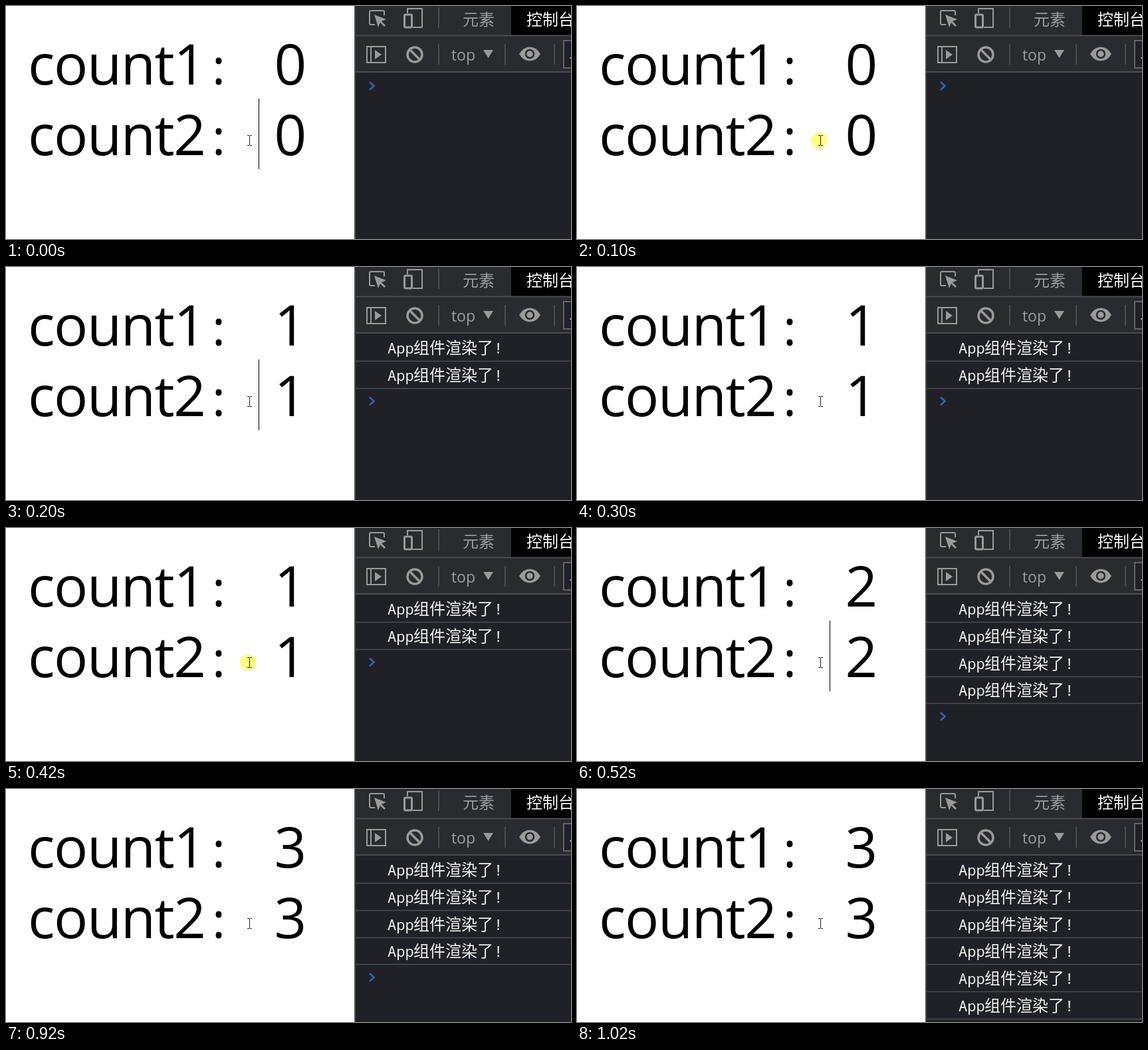
Recreate the animation shown at these times as an HTML page. Size 850 by 350 pixels, loop 1.32 s.

```html
<!DOCTYPE html>
<html lang="zh-CN">
<head>
<meta charset="utf-8">
<style>
  html, body { margin: 0; width: 100%; height: 100%; overflow: hidden; background: #fff; }
  svg { display: block; }
  .big { font: 85px "Open Sans", "Noto Sans", sans-serif; }
  .word { letter-spacing: -1.4px; }
  .colon { font-size: 75px; }
  .tab { font: 24px "Noto Sans CJK SC", "Noto Sans CJK", sans-serif; }
  .top { font: 23px "Open Sans", sans-serif; }
  .log { font: 22px "Noto Sans Mono", monospace; fill: #f1f1f1; }
  .han { font: 300 24px "Noto Sans CJK SC", "Noto Sans CJK", sans-serif; }
  .line { fill: none; stroke: #9a9a9a; stroke-width: 2; }
  .rule { fill: none; stroke: #4a4c50; stroke-width: 2; }
</style>
</head>
<body>
<svg width="850" height="350" viewBox="0 0 850 350">
  <circle id="press" cx="364" cy="202" r="12" fill="#ffff80"/>
  <g class="big">
    <text class="word" x="33" y="118">count1</text>
    <text class="word" x="33" y="224">count2</text>
    <text class="colon" x="310" y="118">:</text>
    <text class="colon" x="310" y="224">:</text>
    <text class="num" x="403.5" y="118"></text>
    <text class="num" x="403.5" y="224"></text>
  </g>
  <rect id="caret" x="380" y="139" width="1" height="106"/>
  <path d="M363 194.500h3m1 0h3M366.500 195v14M363 209.500h3m1 0h3" fill="none" stroke="#222"/>

  <rect x="524" width="326" height="350" fill="#202126"/>
  <rect x="524" width="326" height="99" fill="#2a2b2e"/>
  <rect x="760" width="90" height="44" fill="#000"/>
  <path class="rule" d="M525 0V350M526 44.500H850M526 99H850"/>
  <path class="rule" stroke-width="1" d="M651 2V33M651 57V88M751 57V88M825 57V88"/>

  <!-- inspect and device buttons -->
  <path class="line" d="M555 28H549Q547 28 547 26V9Q547 7 549 7H567Q569 7 569 9V14"/>
  <path d="M554 13L572 20L565 23L571 29L569 31L563 25L560 32Z" fill="#9a9a9a"/>
  <path class="line" d="M604 11V4H626V32H612"/>
  <rect class="line" x="599.500" y="13" width="11" height="19" rx="1.500" style="stroke-width:3"/>
  <g class="tab">
    <text x="687" y="29" fill="#9a9da1">元素</text>
    <text x="783" y="29" fill="#fff">控制台</text>
  </g>

  <!-- console toolbar -->
  <path class="line" d="M543 61H571V85H543ZM549 61V85"/>
  <path d="M555 66L565 73L555 80Z" fill="#9a9a9a"/>
  <g class="line" style="stroke-width:3.500">
    <circle cx="615" cy="73" r="11"/>
    <path d="M607 65L623 81"/>
  </g>
  <text class="top" x="670" y="82" fill="#9a9da1">top</text>
  <path d="M718 66H733L725.500 78Z" fill="#9a9a9a"/>
  <path d="M772 72Q778 61.500 788 61.500T804 72Q798 82.500 788 82.500T772 72Z" fill="#9a9a9a"/>
  <circle cx="788" cy="72" r="6" fill="#9a9a9a" stroke="#2a2b2e" stroke-width="2.500"/>
  <rect x="839" y="52" width="20" height="41" fill="#202126" stroke="#626469" stroke-width="2"/>
  <path d="M848 78h2" stroke="#9a9a9a" stroke-width="2"/>

  <g id="logs"></g>
  <path id="prompt" d="M547 114L553.500 120L547 126" fill="none" stroke="#3564b5" stroke-width="2.500"/>
</svg>
<script>
  const LOOP = 1320, ROW = 40.75;
  // start ms, count, log rows, caret shown, button pressed
  const steps = [
    [0, 0, 0, 1, 0],
    [100, 0, 0, 0, 1],
    [200, 1, 2, 1, 0],
    [300, 1, 2, 0, 0],
    [420, 1, 2, 0, 1],
    [520, 2, 4, 1, 0],
    [920, 3, 4, 0, 0],
    [1020, 3, 6, 0, 0]
  ];
  const $ = id => document.getElementById(id);
  const show = (el, on) => el.setAttribute("visibility", on ? "visible" : "hidden");

  $("logs").innerHTML = Array.from({ length: 6 }, (_, i) => `
    <g transform="translate(0 ${Math.round(i * ROW)})">
      <text class="log" x="574" y="130">App</text>
      <text class="log han" x="613" y="130">组件渲染了</text>
      <text class="log" x="734" y="130">!</text>
      <path class="rule" d="M526 141.500H850" style="stroke-width:1.500"/>
    </g>`).join("");
  const rows = [...$("logs").children];
  const nums = document.querySelectorAll(".num");

  function draw(now) {
    const t = now % LOOP;
    const [, count, logs, caret, press] = steps.findLast(s => s[0] <= t);
    nums.forEach(n => n.textContent = count);
    rows.forEach((row, i) => show(row, i < logs));
    show($("caret"), caret);
    show($("press"), press);
    $("prompt").setAttribute("transform", `translate(0 ${logs * ROW})`);
  }

  const start = performance.now();
  function tick() {
    draw(performance.now() - start);
    requestAnimationFrame(tick);
  }
  tick();
</script>
</body>
</html>
```
